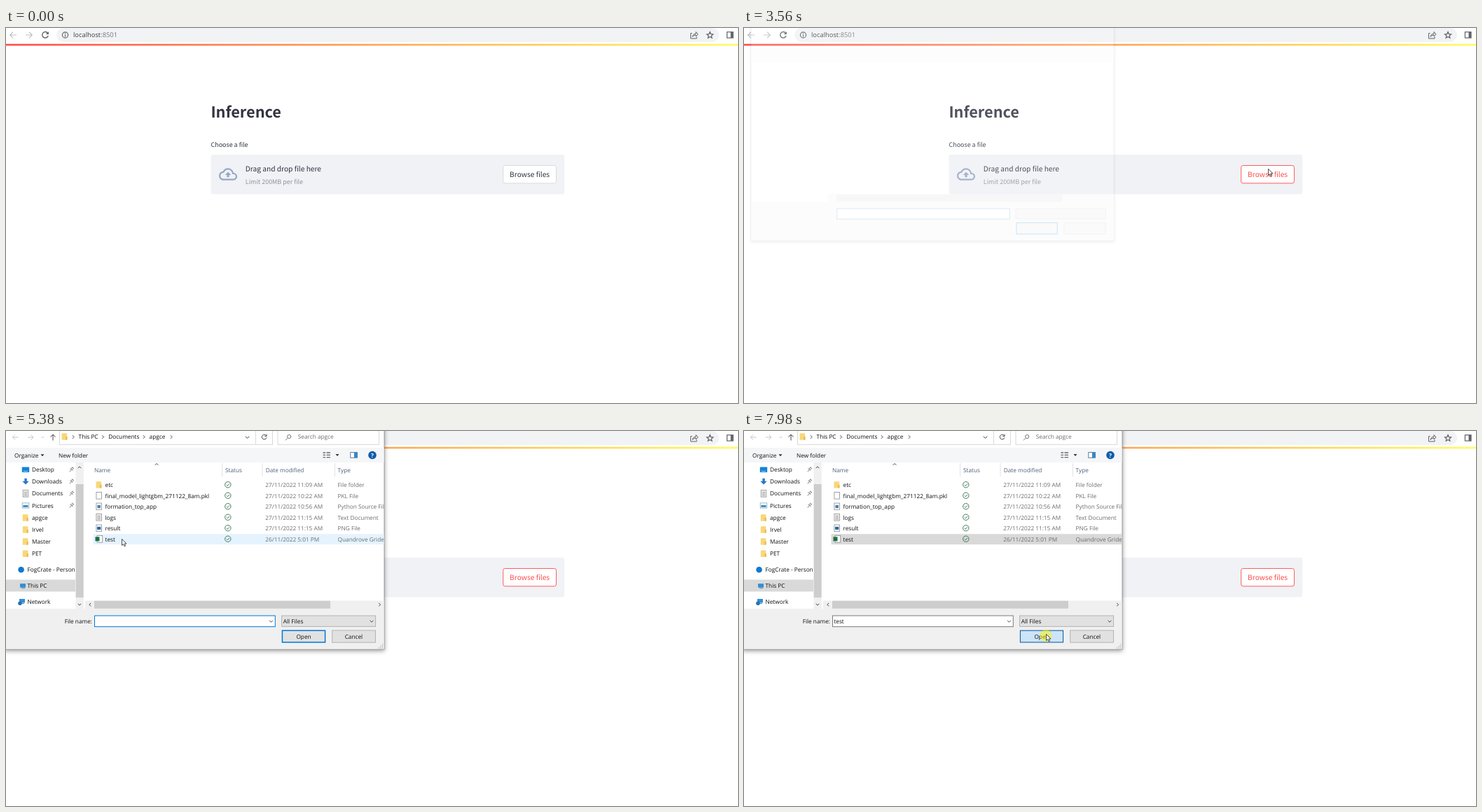
An HTML page that plays this animation: 1045 px wide and 536 px high, repeating every 8000 ms.

```html
<!DOCTYPE html>
<html lang="en">
<head>
<meta charset="utf-8">
<title>Inference</title>
<style>
html, body { margin: 0; width: 100%; height: 100%; overflow: hidden; background: #fff; }
svg { display: block; width: 100%; height: 100%; }
text { text-rendering: geometricPrecision; white-space: pre; }
.web text { font: 8.95px "Noto Sans CJK JP", "Noto Sans CJK SC", "Noto Sans CJK", "Noto Sans", sans-serif; fill: #31333f; }
.web .title { font-size: 21.7px; font-weight: 700; }
.web .big { font-size: 10.2px; }
.web .dim { fill: #8f9299; }
.bar text { font: 9.35px "Open Sans", "Noto Sans", sans-serif; fill: #3c4043; }
.line { fill: none; stroke: #5f6368; stroke-width: 1.2; }
#dialog text { font: 8.25px "Open Sans", "Noto Sans", sans-serif; fill: #111; }
#dialog .gray { fill: #6d6d6d; }
#dialog .head { fill: #4c607a; }
.chev { fill: none; stroke: #444; stroke-width: 1; }
.pale { stroke: #c4c4c4; }
</style>
</head>
<body>
<svg viewBox="0 0 1045 536" xmlns="http://www.w3.org/2000/svg">
  <defs>
    <linearGradient id="warm"><stop stop-color="#ff4b4b"/><stop offset="1" stop-color="#fffd60"/></linearGradient>
    <clipPath id="side"><rect y="45" width="99" height="209"/></clipPath>
    <clipPath id="list"><rect x="111" y="45" width="428.5" height="209"/></clipPath>
  </defs>

  <g class="bar">
    <rect x="72" y="0" width="946" height="20" rx="10" fill="#f1f3f4"/>
    <g class="line">
      <path stroke="#bdc1c6" d="M15 10H6M10 5.7L5.7 10L10 14.3M28 10H37M33 5.7L37.3 10L33 14.3"/>
      <path stroke-width="1.4" d="M59.6 7.3A4.3 4.3 0 1 0 60.2 11"/>
      <circle cx="84.5" cy="10" r="4.1"/>
      <path d="M84.5 9.4V12.4M84.5 7.3V8.4"/>
      <path stroke-width="1" d="M979.5 7.5H977.5V15H986V12.5M980 12.5Q980.5 8.3 985 8.2V5.5L988 9L985 12V10Q981.5 10 980 12.5Z"/>
      <path d="M1005 5.6L1006.3 8.6L1009.5 8.9L1007.1 11L1007.8 14.2L1005 12.5L1002.2 14.2L1002.9 11L1000.5 8.9L1003.7 8.6Z"/>
      <rect x="1029.4" y="5.7" width="8.6" height="8.4"/>
    </g>
    <path fill="#5f6368" d="M60.9 5V9H56.9ZM1034.5 6H1038V14H1034.5Z"/>
    <text x="96" y="13.3">localhost<tspan fill="#73777b">:8501</tspan></text>
    <rect y="22.7" width="1045" height="2.6" fill="url(#warm)"/>
  </g>

  <g class="web">
    <text class="title" x="292.4" y="128.4">Inference</text>
    <text x="292.5" y="169.9">Choose a file</text>
    <rect x="292.5" y="181" width="504.7" height="56.6" rx="3" fill="#f0f2f6"/>
    <path transform="translate(304 196) scale(1.085)" fill="#97a6c3" d="M19.35 10.04A7.49 7.49 0 0 0 12 4C9.11 4 6.6 5.64 5.35 8.04A6 6 0 0 0 0 14c0 3.31 2.69 6 6 6h13c2.76 0 5-2.24 5-5 0-2.64-2.05-4.78-4.65-4.96zM19 18H6c-2.21 0-4-1.79-4-4 0-2.05 1.53-3.76 3.56-3.97l1.07-.11.5-.95C8.08 7.14 9.94 6 12 6c2.62 0 4.88 1.86 5.39 4.43l.3 1.5 1.53.11A2.98 2.98 0 0 1 22 15c0 1.65-1.35 3-3 3zM8 13h2.55v3h2.9v-3H16l-4-4z"/>
    <text class="big" x="341.8" y="205.4">Drag and drop file here</text>
    <text class="dim" x="341.8" y="222.8">Limit 200MB per file</text>
    <rect id="ring" x="708.3" y="195.2" width="78.4" height="28.2" rx="4" fill="none" stroke="#ff4b4b" stroke-opacity=".5" stroke-width="2.3"/>
    <rect id="browse" x="709.7" y="196.5" width="75.8" height="25.4" rx="2.8" stroke-width=".9"/>
    <text id="browseText" class="big" x="747.6" y="212.7" text-anchor="middle">Browse files</text>
  </g>

  <g id="dialog">
    <rect x="-2" y="-52" width="542" height="364" fill="#fff" stroke="#858585" stroke-width=".8" style="filter:drop-shadow(0 2px 3px rgba(0,0,0,.4))"/>
    <path fill="#f5f6f7" d="M-1.6 24H539.6V45H-1.6Z"/>
    <path fill="#f0f0f0" d="M-1.6 254H539.6V311.6H-1.6ZM113 242.5H539.6V254H113Z"/>
    <path fill="#cdcdcd" d="M126 242.8H463V253.7H126Z"/>
    <rect id="nameBox" x="126.5" y="264" width="257.8" height="15.7" fill="#fff" stroke-width="1"/>
    <g fill="#e1e1e1" stroke="#adadad" stroke-width=".9">
      <rect x="393.6" y="264" width="134" height="15.4"/>
      <rect x="465.7" y="285" width="61.8" height="17.2"/>
      <rect id="open" x="394.4" y="285.2" width="61.2" height="16.8" stroke-width="1.5"/>
    </g>
    <g id="detail"></g>
  </g>

  <circle id="glow" r="8.5" fill="#fff500" fill-opacity=".52"/>
  <g id="cursor" fill="#fff" stroke="#222" stroke-width=".8" stroke-linejoin="round">
    <path id="arrow" d="M.5.4V9.5L2.6 7.6L4.1 10.9L5.6 10.2L4.2 7H7Z"/>
    <path id="hand" d="M-1 8V1.4a.9 .9 0 0 1 1.8 0V5l3.6.8q1 .3 1 1.3l-.6 3.2V12.3H0v-1.6L-3 7.7q.2-1.6 2 .3Z"/>
  </g>
</svg>

<script>
const $ = id => document.getElementById(id);
const text = (x, y, s, cls = '', extra = '') => `<text x="${x}" y="${y}" class="${cls}" ${extra}>${s}</text>`;
const rect = (x, y, w, h, fill, extra = '') => `<rect x="${x}" y="${y}" width="${w}" height="${h}" fill="${fill}" ${extra}/>`;
const path = (d, extra = 'class="chev"') => `<path d="${d}" ${extra}/>`;
// Chevron centred on x,y, pointing along dx,dy
const chevron = (x, y, dx, dy, r = 2.3) =>
  path(`M${x - dx * r / 2 - dy * r} ${y - dy * r / 2 - dx * r}L${x + dx * r / 2} ${y + dy * r / 2}L${x - dx * r / 2 + dy * r} ${y - dy * r / 2 + dx * r}`);

const folder = (x, y) => rect(x, y - 4.7, 7.6, 9.4, '#f9d778', 'rx=".6"') + rect(x + 5.8, y, 2.2, 4.7, '#e9b94f');
const sheet = (x, y) => rect(x + .4, y - 4.8, 7.6, 9.6, '#fff', 'stroke="#8b8b8b" stroke-width=".8"');
const lines = (x, y) => path(`M${x} ${y - 2.4}h5M${x} ${y - .6}h5M${x} ${y + 1.2}h5M${x} ${y + 3}h5`, 'stroke="#777" stroke-width=".7"');
const monitor = (x, y) => rect(x, y - 3, 8, 5.5, '#2f8fd8') + rect(x + 2, y + 3, 5, 1, '#6b8aa8');
const icons = {
  folder, sheet,
  desktop: (x, y) => rect(x - 1, y - 3.8, 10.4, 7.6, '#1583d8', 'rx=".6"') + rect(x + 1, y + 2, 6, .8, '#bfe3ff'),
  down: (x, y) => path(`M${x + 2.6} ${y - 4.5}h3.4v4h3L${x + 4.3} ${y + 4.4}L${x - .5} ${y - .5}h3.1Z`, 'fill="#2878c8"'),
  doc: (x, y) => sheet(x, y) + lines(x + 1.7, y),
  image: (x, y) => rect(x - .6, y - 3.6, 9.6, 7.2, '#fff', 'stroke="#8aa" stroke-width=".8"') + rect(x + .6, y - .6, 7.2, 3, '#3b8ccc'),
  code: (x, y) => sheet(x, y) + rect(x + 2, y - 2, 4.4, 4.4, '#4a7fb5'),
  picture: (x, y) => sheet(x, y) + rect(x + 1.6, y - 2, 5.2, 4.2, '#2468b0'),
  table: (x, y) => sheet(x + 1.2, y) + rect(x - 1, y - 3, 6, 6, '#1d7044'),
  disc: (x, y) => `<circle cx="${x + 3.6}" cy="${y}" r="4.3" fill="#0f78d4"/>`,
  pc: monitor,
  net: (x, y) => monitor(x + 1, y - 1.2) + `<circle cx="${x + 2}" cy="${y + 2}" r="2.8" fill="#2d6fb4"/>`
};

const pin = y => `<g transform="translate(93.4 ${y}) rotate(40)" stroke="#777" stroke-width=".9">${path('M-1.6 -3.4h3.2M-1 -3.4v3M1 -3.4v3M-2.5 -.2h5M0 0v4', '')}</g>`;

const places = [
  ['Desktop', 55.2, 'desktop', 37, 1], ['Downloads', 72.2, 'down', 37, 1], ['Documents', 89.4, 'doc', 37, 1],
  ['Pictures', 106.5, 'image', 37, 1], ['apgce', 124, 'folder', 37], ['Irvel', 141, 'folder', 37],
  ['Master', 158, 'folder', 37], ['PET', 175.2, 'folder', 37], ['FogCrate - Personal', 198.3, 'disc', 30.5],
  ['This PC', 221.2, 'pc', 30.5], ['Network', 244.2, 'net', 30.5]
];
const files = [
  ['etc', '27/11/2022 11:09 AM', 'File folder', 'folder'],
  ['final_model_lightgbm_271122_8am.pkl', '27/11/2022 10:22 AM', 'PKL File', 'sheet'],
  ['formation_top_app', '27/11/2022 10:56 AM', 'Python Source File', 'code'],
  ['logs', '27/11/2022 11:15 AM', 'Text Document', 'doc'],
  ['result', '27/11/2022 11:15 AM', 'PNG File', 'picture'],
  ['test', '26/11/2022 5:01 PM', 'Quandrove Gridel C', 'table']
];
const ROW_TOP = 69.5, ROW_H = 15.5;

const header = () =>
  rect(76.5, -4, 304, 23.4, '#fff', 'stroke="#d9d9d9"') + path('M356.5 0V19', 'stroke="#d9d9d9"') +
  rect(388, -4, 144.6, 23.4, '#fff', 'stroke="#d9d9d9"') +
  path('M17.5 9H9.5M13 5.5L9.5 9L13 12.5M31 9H39M35.5 5.5L39 9L35.5 12.5M50.5 8L52.3 9.8L54.1 8', 'class="chev pale"') +
  path('M67 13.5V5M63.5 8.5L67 5L70.5 8.5') + folder(79.5, 8) +
  [96, 138.5, 197, 236].map(x => chevron(x, 8.5, 1, 0)).join('') +
  text(103.6, 11.4, 'This PC') + text(146.2, 11.4, 'Documents') + text(204.6, 11.4, 'apgce') +
  chevron(344.5, 9, 0, 1, 2.8) + path('M371.5 6.6A3.4 3.4 0 1 0 372 9.4M372 4.7V7.4H369.3') +
  path('M399 13.3L402 10.2M401.6 8A2.6 2.6 0 1 1 406.8 8A2.6 2.6 0 1 1 401.6 8', 'class="chev pale" style="stroke:#777"') +
  text(416.8, 11.4, 'Search apgce', 'gray') +
  text(12, 38, 'Organize') + text(75, 38, 'New folder') +
  path('M49.5 33.3H54.5L52 36.2ZM470.5 33H475.5L473 36Z', 'fill="#333"') +
  path('M452.5 31H456M452.5 34.3H456M452.5 37.6H456M457.5 31H463M457.5 34.3H463M457.5 37.6H463', 'stroke="#666" stroke-width="1.3"') +
  rect(491.8, 30.6, 9.6, 7.6, '#fff', 'stroke="#4a6d8c" stroke-width=".9"') + rect(497, 31, 4.4, 7, '#2a8ad4') +
  '<circle cx="523" cy="34.5" r="5.8" fill="#0b5cad"/>' + text(523, 37.7, '?', '', 'text-anchor="middle" style="fill:#fff;font-weight:700"');

const sidebar = () =>
  rect(99.5, 45, 11.3, 209, '#f0f0f0') + rect(99.7, 76, 10.9, 162, '#cdcdcd') +
  chevron(105, 52, 0, -1) + chevron(105, 248, 0, 1) +
  '<g clip-path="url(#side)">' + rect(-1.6, 212.5, 101, 17, '#d9d9d9') +
  places.map(([name, y, icon, x, pinned]) =>
    icons[icon](x > 31 ? 23.8 : icon === 'pc' ? 20 : 18, y) + text(x, y + 3, name) + (pinned ? pin(y) : '')).join('') + '</g>';

const listing = () =>
  '<g clip-path="url(#list)">' + path('M308.6 46V65M366 46V65M469.5 46V65', 'stroke="#e2e2e2"') +
  [[126, 'Name'], [313, 'Status'], [370.7, 'Date modified'], [473.6, 'Type']].map(([x, s]) => text(x, 58.6, s, 'head')).join('') +
  chevron(215, 47.6, 0, -1) + `<rect id="row" x="124.5" width="416" height="15" stroke-width=".8"/>` +
  files.map(([name, date, kind, icon], i) => {
    const y = ROW_TOP + ROW_H * (i + .5);
    return icons[icon](128.5, y - .4) + text(141.5, y + 2.9, name) + text(370.3, y + 2.9, date, 'gray') + text(473.6, y + 2.9, kind, 'gray') +
      `<circle cx="316.8" cy="${y - .5}" r="4.2" fill="none" stroke="#2f6b4c" stroke-width=".9"/>` +
      path(`M314.8 ${y - .4}l1.5 1.5l2.6 -2.9`, 'fill="none" stroke="#2f6b4c" stroke-width=".9"');
  }).join('') + '</g>' + chevron(120, 248.2, -1, 0) + chevron(533.4, 248.2, 1, 0);

const footer = () =>
  text(123, 275, 'File name:', '', 'text-anchor="end"') + text(128.4, 275, 'test', '', 'id="fileName"') +
  rect(128.2, 265.8, .9, 11.4, '#000', 'id="caret"') +
  chevron(378.5, 272, 0, 1, 2.4) + text(395.8, 275, 'All Files') + chevron(522, 272, 0, 1, 2.4) +
  text(425, 296.7, 'Open', '', 'text-anchor="middle"') + text(496.4, 296.7, 'Cancel', '', 'text-anchor="middle"') +
  path('M537.5 304.5v1.3M537.5 307v1.3M537.5 309.5v1.3M535 307v1.3M535 309.5v1.3M532.5 309.5v1.3', 'stroke="#aaa" stroke-width="1.3"');

$('detail').innerHTML = header() + sidebar() + listing() + footer();

// Pointer moves: start, end, number of steps, way points
const moves = [
  [640, 1410, 11, [[962, 525], [905, 440], [840, 345], [785, 272], [759, 244], [751, 236.5]]],
  [1480, 1620, 2, [[750, 228], [748, 222], [747, 217]]],
  [1880, 2220, 4, [[748, 216], [750, 214], [747, 213]]],
  [3140, 3270, 1, [[748, 206], [748, 201]]],
  [4160, 4920, 11, [[742, 200], [640, 186], [470, 165], [310, 143], [210, 128], [172, 122]]],
  [5050, 5180, 2, [[169, 134], [166, 148], [165, 154]]],
  [5980, 6490, 7, [[167, 158], [183, 195], [211, 247], [247, 288]]],
  [6560, 6760, 3, [[288, 328], [340, 366], [398, 368], [436, 331]]],
  [6830, 7450, 9, [[437, 322], [436, 305], [433, 294], [431, 290]]]
];
function pointerAt(t) {
  const move = moves.filter(m => m[0] <= t).pop();
  if (!move) return null;
  const [from, to, steps, pts] = move;
  const k = Math.min(steps, Math.floor((t - from) / (to - from) * steps + 1e-6));
  const u = k / steps * (pts.length - 1), i = Math.min(pts.length - 2, Math.floor(u));
  return pts[i].map((v, axis) => v + (pts[i + 1][axis] - v) * (u - i));
}

// Dialog opening: time, opacity, scale
const opening = [[3420, .04, .935], [3490, .09, .946], [3560, .15, .956], [3630, .4, .975], [3700, .75, .99], [3770, 1, 1]];

const between = (t, a, b) => t >= a && t < b;
const show = (id, on) => { $(id).style.display = on ? '' : 'none'; };
const set = (id, attrs) => { for (const k in attrs) $(id).setAttribute(k, attrs[k]); };

function draw(t) {
  const pointer = pointerAt(t);
  const [x, y] = pointer || [-50, -50];
  const pressing = between(t, 2880, 3140) || between(t, 5780, 5980) || t >= 7910;
  show('cursor', pointer);
  set('cursor', { transform: `translate(${x} ${y})` });
  show('hand', between(t, 1480, 3270));
  show('arrow', !between(t, 1480, 3270));
  show('glow', pressing);
  set('glow', { cx: x, cy: y + 2.5 });

  const hot = t >= 1480, down = between(t, 2880, 3140);
  show('ring', down);
  set('browse', { fill: down ? '#ff4b4b' : '#fff', stroke: hot ? '#ff4b4b' : '#d6d6d9' });
  $('browseText').style.fill = down ? '#fff' : hot ? '#ff4b4b' : '';

  const phase = opening.filter(p => p[0] <= t).pop();
  show('dialog', phase);
  if (!phase) return;
  const [, opacity, scale] = phase;
  set('dialog', { opacity, transform: `translate(269 130) scale(${scale}) translate(-269 -130)` });
  show('detail', t >= 3600);

  const chosen = t >= 5780, pressed = t >= 7910;
  const hover = Math.floor((y - ROW_TOP) / ROW_H);
  const row = chosen ? 5 : hover;
  show('row', chosen || (between(x, 125, 539) && between(hover, 0, 6)));
  set('row', {
    y: ROW_TOP + ROW_H * row + .2,
    fill: pressed ? '#d9d9d9' : chosen ? '#cce8ff' : '#e5f3ff',
    stroke: chosen && !pressed ? '#99d1ff' : 'none'
  });
  show('fileName', chosen);
  show('caret', t < 4390 || between(t, 4900, 5380));
  set('nameBox', { stroke: chosen ? '#7a7a7a' : '#0078d7' });

  const over = between(x, 394, 456) && between(y, 285, 302);
  set('open', {
    fill: pressed ? '#cce4f7' : over ? '#e5f1fb' : '#e1e1e1',
    stroke: pressed ? '#005499' : '#0078d7',
    'stroke-width': over ? 1 : 1.5
  });
}

const start = performance.now();
function tick() {
  draw((performance.now() - start) % 8000);
  requestAnimationFrame(tick);
}
tick();
</script>
</body>
</html>
```
